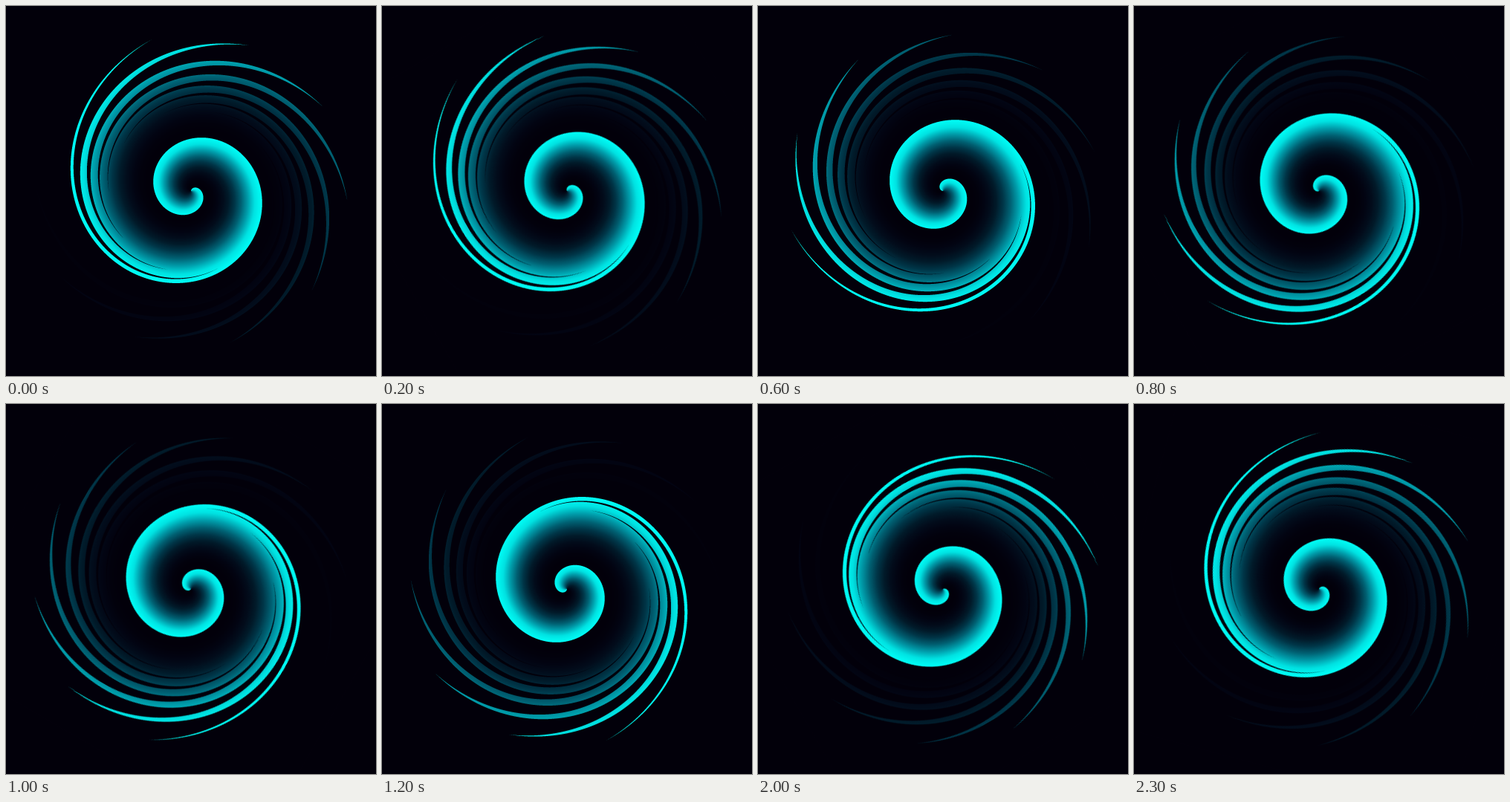
An HTML page with a canvas that plays this animation: 498x498 px, repeating every 2.4 s.

```html
<!DOCTYPE html>
<html lang="en">
<head>
<meta charset="utf-8">
<title>Spiral</title>
<style>
  html, body {
    margin: 0;
    width: 100%;
    height: 100%;
    overflow: hidden;
    background: rgb(2, 0, 10);
  }
  canvas {
    position: absolute;
    left: 0;
    top: 0;
    width: 498px;
    height: 498px;
    animation: spin 2400ms steps(24, end) infinite;
  }
  @keyframes spin {
    to { transform: rotate(-360deg); }
  }
</style>
</head>
<body>
<canvas id="spiral" width="996" height="996"></canvas>
<script>
  const SIZE = 498, SCALE = 2, CENTRE = SIZE / 2;
  const SAMPLES = 2;   // samples per canvas pixel in each direction
  const SPLIT = 110;   // radius where the arm splits into blades
  const TIP = 211;     // radius where the blades end
  const BLADE = 36;    // degrees between blades

  // Colours at every 36 degrees behind the bright edge.
  const BACK = [2, 0, 10];
  const STOPS = [
    [0, 255, 247], [0, 226, 226], [0, 155, 169], [0, 96, 114],
    [0, 54, 72], [1, 27, 42], [2, 12, 27], [2, 4, 18],
    [2, 1, 12], BACK, BACK
  ];

  // Radius of the bright edge after q quarter turns.
  const radius = q =>
    -0.4 + 13.1 * q + 1.14 * q * q + 28.5 * Math.exp(1.36 * (q - 7.62));

  // Angle of the bright edge for each tenth of a pixel of radius.
  const edgeAngle = [];
  for (let i = 0, q = 0; i <= TIP * 10 + 10; i++) {
    while (radius(q) < i / 10) q += 0.0005;
    edgeAngle.push((q - 1) * 90);
  }

  function angleAt(r) {
    const i = Math.floor(r * 10), f = r * 10 - i;
    return edgeAngle[i] + (edgeAngle[i + 1] - edgeAngle[i]) * f;
  }

  // Share of the space between blade centres that a blade fills.
  function bladeWidth(r) {
    return r < SPLIT ? 1 : Math.pow((TIP - r) / (TIP - SPLIT), 1.2);
  }

  function addColour(x, y, sum) {
    const dx = x - CENTRE, dy = y - CENTRE;
    const r = Math.hypot(dx, dy);
    let a = BACK, b = BACK, mix = 0;
    if (r < TIP) {
      const angle = Math.atan2(dy, dx) * 180 / Math.PI;
      const behind = (((angle - angleAt(r)) % 360) + 360) % 360 / BLADE;
      if (Math.abs(behind - Math.round(behind)) <= bladeWidth(r) / 2) {
        const k = Math.floor(behind);
        a = STOPS[k];
        b = STOPS[k + 1];
        mix = behind - k;
      }
    }
    for (let c = 0; c < 3; c++) sum[c] += a[c] + (b[c] - a[c]) * mix;
  }

  const canvas = document.getElementById("spiral");
  const ctx = canvas.getContext("2d");
  const side = SIZE * SCALE;
  const image = ctx.createImageData(side, side);
  const sum = [0, 0, 0];

  for (let y = 0, p = 0; y < side; y++) {
    for (let x = 0; x < side; x++, p += 4) {
      sum.fill(0);
      for (let j = 0; j < SAMPLES; j++) {
        for (let i = 0; i < SAMPLES; i++) {
          addColour((x + (i + 0.5) / SAMPLES) / SCALE,
                    (y + (j + 0.5) / SAMPLES) / SCALE, sum);
        }
      }
      for (let c = 0; c < 3; c++) {
        image.data[p + c] = Math.round(sum[c] / SAMPLES ** 2);
      }
      image.data[p + 3] = 255;
    }
  }
  ctx.putImageData(image, 0, 0);
</script>
</body>
</html>
```
